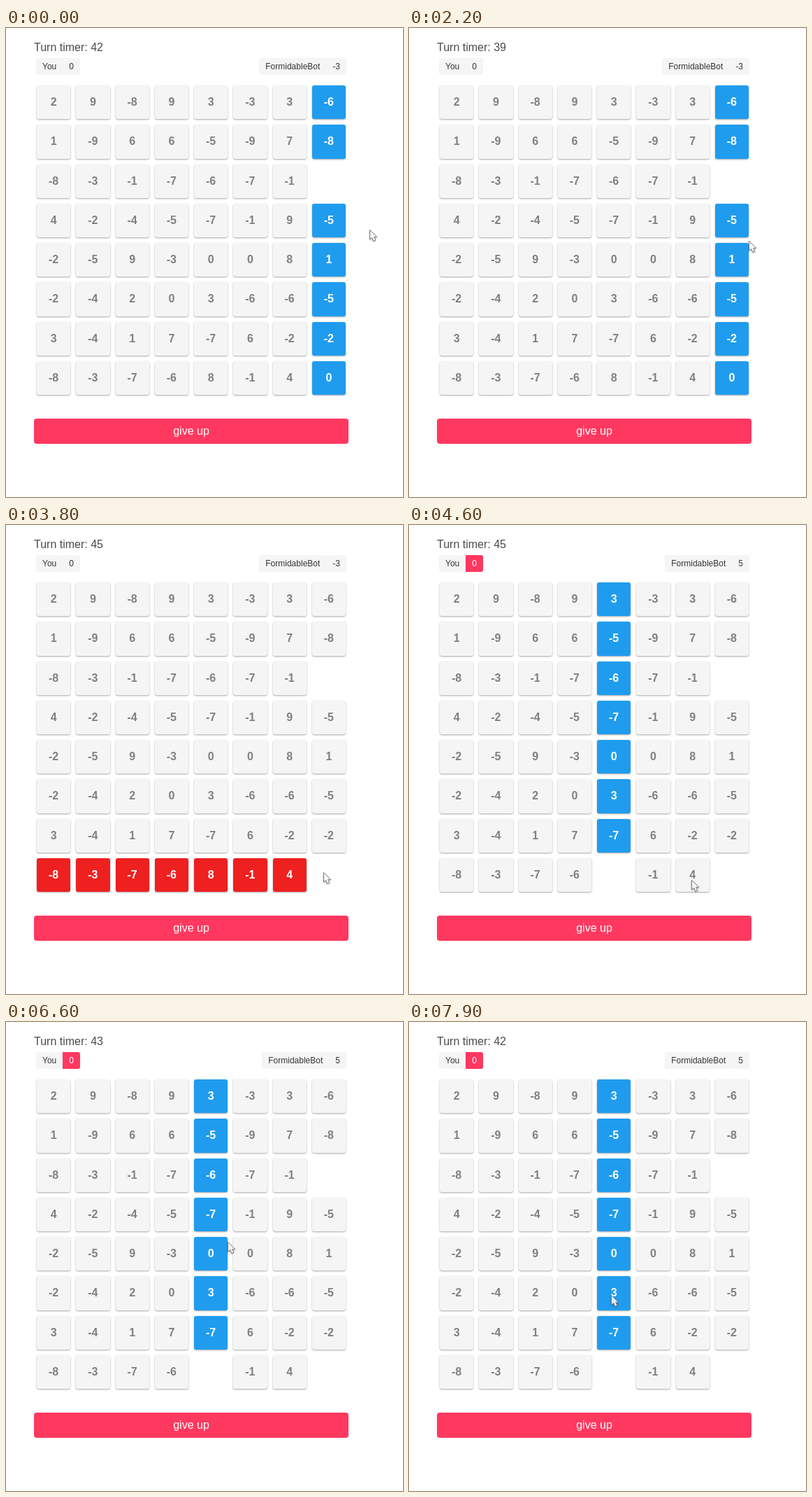
Recreate the animation shown at these times as an HTML page. Size 568 px wide and 670 px high, loop 8000 ms.

```html
<!DOCTYPE html>
<html lang="en">
<head>
<meta charset="utf-8">
<title>Number grid game</title>
<style>
html, body { margin: 0; width: 100%; height: 100%; overflow: hidden; background: #fff; }
body { position: relative; font: 16px/24px "Liberation Sans", Arial, sans-serif; color: #4a4a4a; }
#timer, .tags, .tile, #quit, #cursor { position: absolute; white-space: nowrap; }
#timer { left: 40px; top: 16px; }
.tags { top: 43px; display: flex; font-size: 12px; color: #363636; border-radius: 3px; overflow: hidden; }
.tags span { padding: 0 9px; background: #f5f5f5; }
.tags .active { background: #ff3860; color: #fff; }
.tile {
  width: 48.25px; height: 48.25px; line-height: 48.25px;
  border-radius: 3px; text-align: center; font-weight: bold;
  background: #f5f5f5; color: #808080;
  box-shadow: 0 1px 3px rgba(0,0,0,.12), 0 1px 2px rgba(0,0,0,.24);
}
.tile.mine { background: #209cee; color: #fff; }
.tile.theirs { background: #ee2020; color: #fff; }
.tile.taken { visibility: hidden; }
#quit {
  left: 40px; top: 558px; width: 450px; height: 36px; line-height: 36px;
  border-radius: 4px; background: #ff3860; color: #fff; text-align: center;
}
#cursor { left: 0; top: 0; overflow: visible; filter: drop-shadow(0 1px 1px rgba(0,0,0,.35)); }
</style>
</head>
<body>
<div id="timer"></div>
<div class="tags" style="left:43px"><span>You</span><span id="you">0</span></div>
<div class="tags" style="right:calc(100% - 487px)"><span>FormidableBot</span><span id="bot"></span></div>
<div id="board"></div>
<div id="quit">give up</div>
<svg id="cursor" width="12" height="18">
  <path d="M-.5 .5V14L2.6 11.4L4.8 16.3L7.8 15.1L5.7 10.4H9.7Z"
    fill="#fff" fill-opacity=".88" stroke="#808080" stroke-linejoin="round"/>
</svg>
<script>
const LOOP = 8000, TICK = 100;
const $ = id => document.getElementById(id);

const board = `2 9 -8 9 3 -3 3 -6
1 -9 6 6 -5 -9 7 -8
-8 -3 -1 -7 -6 -7 -1 0
4 -2 -4 -5 -7 -1 9 -5
-2 -5 9 -3 0 0 8 1
-2 -4 2 0 3 -6 -6 -5
3 -4 1 7 -7 6 -2 -2
-8 -3 -7 -6 8 -1 4 0`;

// A bot's pick opens its column to the player; a player's pick opens its row to the bot.
const picks = [
  { at: 0, row: 2, col: 7, byBot: true, score: -3 },
  { at: 3800, row: 7, col: 7, byBot: false, score: -3 },
  { at: 4600, row: 7, col: 4, byBot: true, score: 5 }
];

// Pointer glides: [start, end, x, y]
const glides = [
  [0, 100, 521, 291],
  [200, 600, 464, 486],
  [1000, 1300, 464, 494],
  [1900, 2100, 500, 370],
  [2100, 2200, 487, 304],
  [2200, 2400, 464, 284],
  [2800, 3100, 455, 487],
  [3200, 3300, 455, 496],
  [4500, 4600, 405, 507],
  [4600, 4700, 385, 517],
  [4700, 5400, 310, 313],
  [6500, 6600, 318, 314],
  [6600, 7100, 296, 290],
  [7400, 7900, 290, 390]
];

const tiles = board.split("\n").flatMap((line, row) => line.split(" ").map((value, col) => {
  const el = document.createElement("div");
  el.textContent = value;
  el.style.left = 44 + 56.25 * col + "px";
  el.style.top = 82 + 56.25 * row + "px";
  $("board").append(el);
  return { el, row, col };
}));

function pointerAt(t) {
  let x = 521, y = 288;
  for (const [start, end, toX, toY] of glides) {
    const u = Math.max(0, Math.min(1, (t - start) / (end - start)));
    const ease = u * u * (3 - 2 * u);
    x += (toX - x) * ease;
    y += (toY - y) * ease;
  }
  return [Math.round(x), Math.round(y)];
}

function secondsLeft(t) {
  return t < picks[1].at
    ? 42 - Math.floor((t + 900) / 1000)
    : Math.min(45, 45 - Math.floor((t - picks[2].at) / 1000));
}

function tileState({ row, col }, done, last) {
  if (done.some(p => p.row == row && p.col == col)) return "taken";
  if (last.byBot) return col == last.col ? "mine" : "";
  return row == last.row ? "theirs" : "";
}

function draw(t) {
  const done = picks.filter(p => p.at <= t), last = done.at(-1);
  $("timer").textContent = "Turn timer: " + secondsLeft(t);
  $("you").className = done.length == picks.length ? "active" : "";
  $("bot").textContent = last.score;
  for (const tile of tiles) tile.el.className = "tile " + tileState(tile, done, last);
  const [x, y] = pointerAt(t);
  $("cursor").style.transform = `translate(${x}px, ${y}px)`;
}

let begin;
function frame(now) {
  begin ??= now;
  draw(Math.floor((now - begin) % LOOP / TICK) * TICK);
  requestAnimationFrame(frame);
}
draw(0);
requestAnimationFrame(frame);
</script>
</body>
</html>
```
